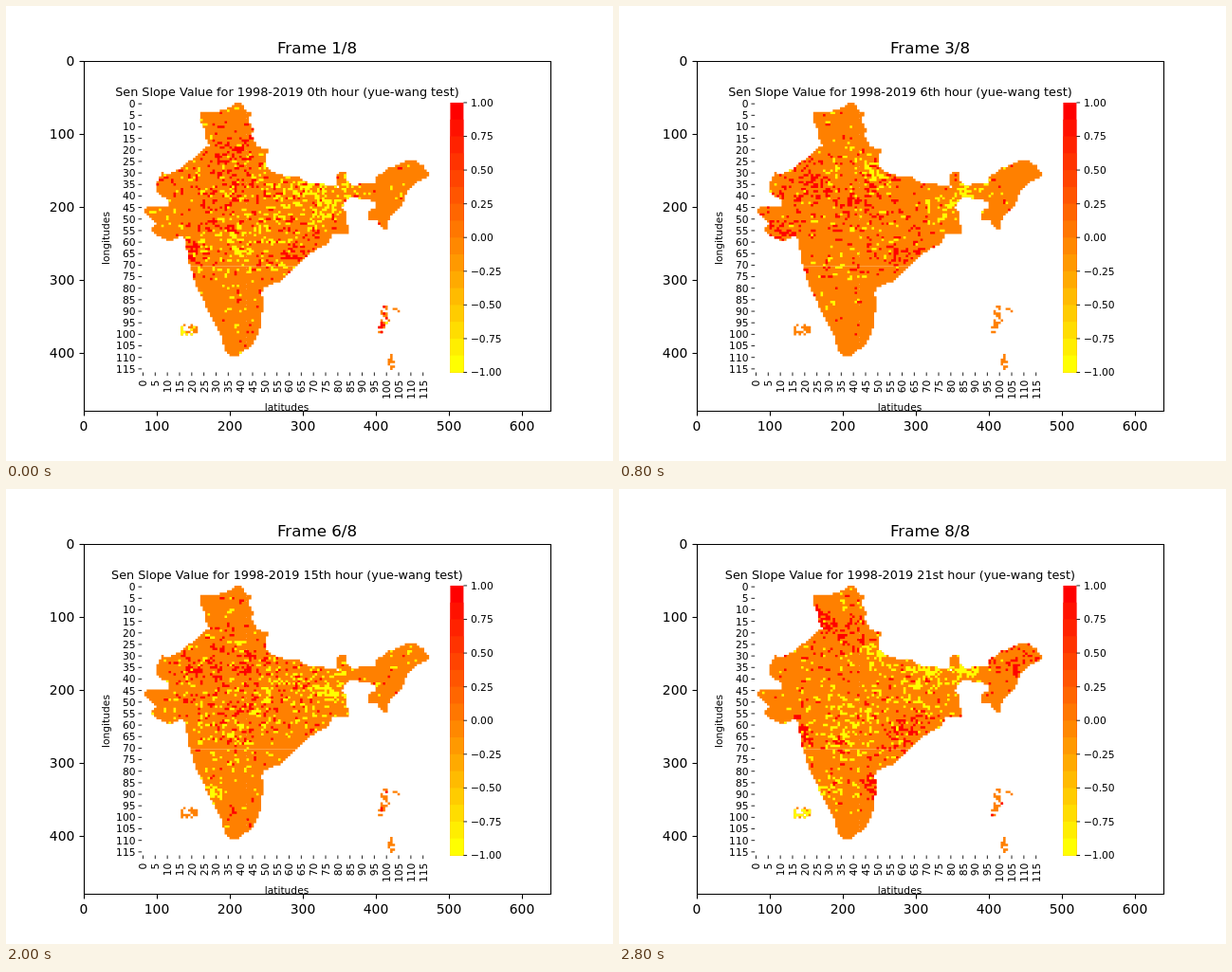
Recreate the animation shown at these times as an HTML page. Size 640 by 480 pixels, loop 3.2 s.

```html
<!DOCTYPE html>
<html lang="en">
<head>
<meta charset="utf-8">
<title>Sen slope by hour</title>
<style>
  html, body { margin: 0; width: 100%; height: 100%; overflow: hidden; background: #fff; }
  svg { display: block; width: 640px; height: 480px; font-family: "DejaVu Sans", sans-serif; }
</style>
</head>
<body>
<svg id="stage" viewBox="0 0 640 480"></svg>
<script>
const NS = 'http://www.w3.org/2000/svg';
const stage = document.getElementById('stage');
const STEP = 400;
const COLS = 119, ROWS = 117;
const BOX = { x: 143.2, y: 101.95, w: 305.5, h: 284.55 };
const CW = BOX.w / COLS, CH = BOX.h / ROWS;
const colX = c => BOX.x + c * CW;
const rowY = r => BOX.y + r * CH;

function add(tag, attrs) {
  const el = document.createElementNS(NS, tag);
  for (const k in attrs) el.setAttribute(k, attrs[k]);
  return stage.appendChild(el);
}
function label(text, x, y, size, anchor = 'middle', turn = 0) {
  const el = add('text', { x, y, 'font-size': size, 'text-anchor': anchor });
  if (turn) el.setAttribute('transform', `rotate(${turn} ${x} ${y})`);
  el.textContent = text;
  return el;
}
const line = (d, width) => add('path', { d, fill: 'none', stroke: '#000', 'stroke-width': width });

function noise(c, r, seed) {
  let h = Math.imul(c + 1, 374761393) ^ Math.imul(r + 1, 668265263) ^ Math.imul(seed, 974634777);
  h = Math.imul(h ^ (h >>> 13), 1274126177);
  h = Math.imul(h ^ (h >>> 16), 2246822519);
  return ((h ^ (h >>> 15)) >>> 0) / 4294967296;
}
// Borrowing a neighbour's value makes small clumps
function clumped(c, r, seed) {
  const pick = noise(c, r, seed + 50);
  if (pick < 0.3) return noise(c - 1, r, seed);
  return noise(c, pick < 0.45 ? r - 1 : r, seed);
}
// Value noise with a period of six cells
function smooth(c, r, seed) {
  const x = Math.floor(c / 6), y = Math.floor(r / 6), u = c / 6 - x, v = r / 6 - y;
  const row = k => noise(x, k, seed) * (1 - u) + noise(x + 1, k, seed) * u;
  return row(y) * (1 - v) + row(y + 1) * v;
}

// Outlines, and the share of cells they keep
const shape = (keep, pts) => ({ keep, pts: pts.split(' ').map(p => p.split(',').map(Number)) });
const shapes = [
  shape(1, '240,105 243,101 247,102 254,110 259,113 256,122 261,130 259,136 264,147 ' +
    '279,153 273,159 274,170 288,178 310,181 318,186 340,189 350,191 348,180 353,174 358,174 ' +
    '361,188 361,203 354,212 359,217 361,240 345,240 338,252 322,260 309,272 290,290 273,297 269,303 ' +
    '272,311 267,345 259,358 244,370 236,370 230,362 227,347 214,325 209,311 200,295 ' +
    '191,263 190,245 184,243 173,249 158,241 152,234 160,230 144,217 148,212 172,211 ' +
    '171,205 160,198 158,187 165,176 172,178 186,170 206,153 214,147 210,138 211,131 204,121 ' +
    '204,111 225,111 235,107'),
  shape(1, '357,186 370,190 374,186 389,186 390,181 402,172 420,164 431,163 438,167 445,174 ' +
    '445,180 435,185 424,194 417,212 404,224 403,236 398,237 390,225 381,225 381,218 389,213 390,206 ' +
    '373,204 366,200 357,206'),
  shape(0.8, '397,316 403,316 404,334 394,334'),
  shape(0.8, '394,334 402,334 398,347 391,347'),
  shape(0.7, '400,366 407,366 411,384 405,384'),
  shape(0.4, '184,335 203,335 203,347 184,347'),
  shape(0.2, '406,318 416,318 411,333 406,333')
];
function inside({ pts }, x, y) {
  let hit = false;
  pts.forEach(([ax, ay], i) => {
    const [bx, by] = pts.at(i - 1);
    if (ay > y !== by > y && x < (bx - ax) * (y - ay) / (by - ay) + ax) hit = !hit;
  });
  return hit;
}
const land = [];
for (let r = 0; r < ROWS; r++) {
  for (let c = 0; c < COLS; c++) {
    const x = colX(c + 0.5), y = rowY(r + 0.5);
    if (shapes.some(s => inside(s, x, y) && noise(c, r, 99) < s.keep)) land.push({ c, r, x, y });
  }
}

// Regions: x, y, radius
const regions = {
  kashmir: [214, 135, 9], punjab: [235, 150, 20], rajasthan: [200, 187, 18], centre: [250, 208, 40],
  kutch: [150, 218, 7], gujarat: [170, 238, 14], konkan: [196, 260, 9], deccan: [240, 258, 32],
  kerala: [218, 319, 10], coast: [268, 315, 10], andhra: [305, 262, 22], himalaya: [270, 175, 15],
  bihar: [305, 208, 32], ganges: [327, 191, 14], siliguri: [368, 194, 11], bengal: [345, 215, 13],
  assam: [415, 180, 16], manipur: [403, 205, 18], andaman: [400, 340, 20], islets: [193, 341, 12]
};
// Wider regions are sparser; the central belt always has a few marks
function chance(names, { c, r, x, y }, seed) {
  const belt = Math.exp(-(((x - 250) / 100) ** 2) - ((y - 215) / 80) ** 2);
  return names.split(' ').reduce((sum, name) => {
    const [px, py, rad] = regions[name];
    return sum + 6 / rad * Math.exp(-(((x - px) / rad / 1.2) ** 2) - ((y - py) / rad) ** 2);
  }, 0.015 + 0.14 * belt * smooth(c, r, seed) ** 2);
}
const hours = [
  { name: '0th', red: 'punjab konkan centre andhra andaman', yellow: 'ganges siliguri bengal bihar deccan islets' },
  { name: '3rd', red: 'rajasthan centre gujarat konkan andhra', yellow: 'siliguri bengal himalaya' },
  { name: '6th', red: 'rajasthan centre gujarat andhra', yellow: 'siliguri bengal himalaya' },
  { name: '9th', red: 'kashmir punjab rajasthan centre gujarat kutch andhra assam', yellow: 'himalaya siliguri kerala' },
  { name: '12th', red: 'rajasthan kutch andaman', yellow: 'bengal bihar himalaya centre deccan kerala islets' },
  { name: '15th', red: 'rajasthan centre andaman', yellow: 'bengal bihar deccan kerala' },
  { name: '18th', red: 'rajasthan centre kutch konkan coast siliguri andhra', yellow: 'bengal assam manipur deccan kerala islets' },
  { name: '21st', red: 'kashmir punjab konkan andhra coast assam', yellow: 'ganges siliguri bihar himalaya deccan kerala islets' }
];

const cells = list => list.map(({ c, r }) =>
  `M${colX(c).toFixed(2)} ${rowY(r).toFixed(2)}h${CW.toFixed(3)}v${CH.toFixed(3)}h-${CW.toFixed(3)}z`).join('');
const slides = hours.map(({ red, yellow }, i) => {
  const value = p => clumped(p.c, p.r, i + 1);
  return [
    cells(land.filter(p => value(p) < chance(red, p, i + 20))),
    cells(land.filter(p => value(p) > 1 - chance(yellow, p, i + 40)))
  ];
});

add('path', { d: cells(land), fill: '#ff8000' });
const layers = ['#ff0000', '#ffff00'].map(fill => add('path', { fill }));

// Inner chart
const SMALL = 10.69;
for (let v = 0; v <= 115; v += 5) {
  const x = colX(v + 0.5), y = rowY(v + 0.5);
  line(`M139.5 ${y}H143.2M${x} 386.5V390.2`, 0.86);
  label(v, 136.5, y + 3.9, SMALL, 'end');
  label(v, x + 3.9, 394.7, SMALL, 'end', -90);
}
label('longitudes', 109.4, 245, SMALL, 'middle', -90);
label('latitudes', 296, 427, SMALL);
const heading = label('', 296.4, 94.6, 12.8);

// Colour bar; each band runs under the next one
const BANDS = 16;
for (let i = 0; i < BANDS; i++) {
  const y = BOX.y + i * BOX.h / BANDS;
  add('rect', {
    x: 468.4, y, width: 14, height: BOX.y + BOX.h - y,
    fill: `rgb(255,${Math.round(255 * i / (BANDS - 1))},0)`
  });
}
for (let i = 0; i <= 8; i++) {
  const v = 1 - i / 4, y = BOX.y + i * BOX.h / 8;
  line(`M482.4 ${y}h3.7`, 0.86);
  label((v < 0 ? '\u2212' : '') + Math.abs(v).toFixed(2), 489.9, y + 3.9, SMALL, 'start');
}

// Outer axes
line('M82.5 58.5H574.5V427.5H82.5Z', 1.11);
for (let v = 0; v <= 600; v += 100) {
  const x = 82 + v * 0.77;
  line(`M${Math.round(x) + 0.5} 427.5v5`, 1.11);
  label(v, x, 448, 13.89);
  if (v > 400) continue;
  const y = Math.round(58 + v * 0.77);
  line(`M82.5 ${y + 0.5}h-5`, 1.11);
  label(v, 72.3, y + 5, 13.89, 'end');
}
const counter = label('', 328, 50, 16.67);

let shown = -1;
function draw(time) {
  const i = Math.floor(time / STEP) % hours.length;
  if (i === shown) return;
  shown = i;
  layers.forEach((layer, k) => layer.setAttribute('d', slides[i][k]));
  heading.textContent = `Sen Slope Value for 1998-2019 ${hours[i].name} hour (yue-wang test)`;
  counter.textContent = `Frame ${i + 1}/${hours.length}`;
}
const start = performance.now();
function tick() {
  draw(performance.now() - start);
  requestAnimationFrame(tick);
}
tick();
</script>
</body>
</html>
```
